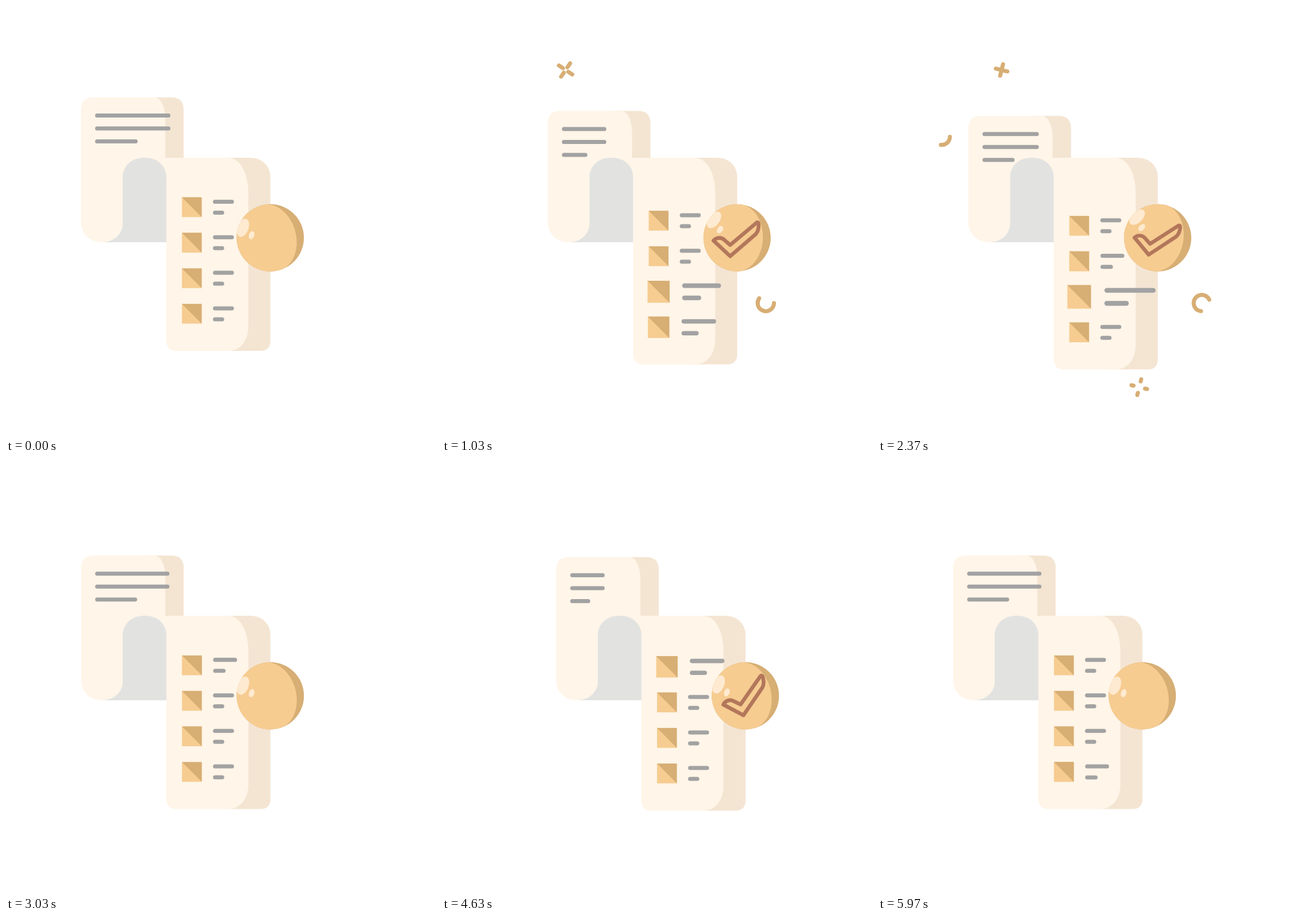
An HTML page with a canvas that plays this animation: 748x748 px, repeating every 6 s.

```html
<!DOCTYPE html>
<html lang="en">
<head>
<meta charset="utf-8">
<title>Checklist</title>
<style>
html, body { margin: 0; height: 100%; overflow: hidden; background: #fff; }
canvas { display: block; }
</style>
</head>
<body>
<canvas id="stage" width="748" height="748"></canvas>
<script>
const c = document.getElementById('stage').getContext('2d');
const LIGHT = '#fff5e8', SHADE = '#f4e5d3', GREY = '#e2e3e1', INK = '#a2a2a2';
const GOLD = '#f6cc91', DARK = '#d7ae74', SHINE = '#feead1', TICK = '#b3775b';
const RAD = Math.PI / 180, FRAME = 100 / 3;

const clamp = v => Math.min(1, Math.max(0, v));
const smooth = v => (v = clamp(v)) * v * (3 - 2 * v);
// Rises from 0 to 1 until the peak, then falls back to 0 at the end.
const tent = (t, peak, end) => clamp(t < peak ? t / peak : (end - t) / (end - peak));

function fill(d, color) {
  c.fillStyle = color;
  c.fill(new Path2D(d));
}

function at(x, y, turn, scale, draw) {
  c.save();
  c.translate(x, y);
  c.rotate(turn * RAD);
  c.scale(scale, scale);
  draw();
  c.restore();
}

function stroke(d, color, width) {
  c.strokeStyle = color;
  c.lineWidth = width;
  c.stroke(new Path2D(d));
}

// A round-capped bar whose outer width is w
const bar = (x, y, w) => stroke(`M${x + 3.5},${y}h${w - 7}`, INK, 7);

function ellipse(x, y, rx, ry, turn, color) {
  c.fillStyle = color;
  c.beginPath();
  c.ellipse(x, y, rx, ry, turn * RAD, 0, 7);
  c.fill();
}

function paper(dy, shrink) {
  const top = 159 + dy, end = 600 + dy;
  fill(`M240,${top}H288Q309,${top} 309,${top + 22}V280H240Z`, SHADE);
  fill(`M130.5,${top + 22}Q130.5,${top} 152,${top}H258C269,${top} 277,${top + 16} 277,${top + 36}
    V300H203V378C203,397 187,411 167,411S130.5,397 130.5,376Z`, LIGHT);
  fill(`M370,264H425C445,264 460,278 460,298V${end - 18}Q460,${end} 442,${end}H370Z`, SHADE);
  fill(`M241,264H386C407,264 421.5,290 421.5,325V${end - 43}
    C421.5,${end - 17} 407,${end} 386,${end}H297Q279,${end} 279,${end - 18}V300H241Z`, LIGHT);
  fill(`M167,411C187,411 203,397 203,378V298C203,278 219,264 239,264H243
    C263,264 279,278 279,298V411Z`, GREY);
  bar(155, top + 31.5, 131 - 78 * shrink);
  bar(155, top + 54, 131 - 78 * shrink);
  bar(155, top + 76.5, 74 - 43 * shrink);
}

function item(i, t, dy) {
  const grow = tent(t - 300 * i, 300, 600);
  at(323.2, 350 + 61.8 * i + dy, 0, 1 + 0.2 * smooth(grow), () => {
    fill('M-17.2,-17.2h34.4v34.4h-34.4Z', GOLD);
    fill('M-17.2,-17.2h34.4v34.4Z', DARK);
    bar(36.8, -9.5, 36.5 + 43 * grow);
    bar(36.8, 9.5, 19.5 + 18 * grow);
  });
}

function badge(turn, tick) {
  at(459.7, 403.2, turn, 1, () => {
    c.save();
    c.beginPath();
    c.arc(0, 0, 58.5, 0, 7);
    c.clip();
    c.fillStyle = DARK;
    c.fillRect(-60, -60, 120, 120);
    c.save();
    c.rotate(-15 * RAD);
    fill('M0,-59A45,59 0 0 1 0,59H-60V-59Z', GOLD);
    c.restore();
    ellipse(-47.5, -17.5, 9.6, 16.5, 20, SHINE);
    ellipse(-32.5, -4.5, 4.7, 7.2, 18, SHINE);
    c.restore();
    if (tick > 0.005) at(0, 0, -17.5, tick, () => stroke(`M-41,5C-36,-1 -28,-1 -23,3L-12,12.5
      L33,-25.5C37,-29 38,-25 37.5,-20C37,-12 35,-9 32,-6L-12,32Z`, TICK, 6.6));
  });
}

// Drawn part of a path that grows from its start and is then eaten up from its start
function trim(t, start) {
  return [clamp((t - start - 333.3) / 500), clamp((t - start) / 500)];
}

function spark(x, y, t, start) {
  const [a, b] = trim(t, start);
  if (b - a < 0.001) return;
  for (let k = 0; k < 4; k++) {
    at(x, y, 0.12 * t + 90 * k, 1, () => stroke(`M${14 * a},0H${14 * b}`, DARK, 7));
  }
}

function ring(x, y, t, start) {
  const [a, b] = trim(t, start);
  if (b - a < 0.001) return;
  c.strokeStyle = DARK;
  c.lineWidth = 7;
  c.beginPath();
  c.arc(x, y, 14.2, -a * 2 * Math.PI, -b * 2 * Math.PI, true);
  c.stroke();
}

function draw(now) {
  const long = Math.floor((now % 6000 + 4) / FRAME) * FRAME % 3000;
  const t = long % 1500;
  const sway = tent(long, 1500, 3000);
  const dy = 34.6 * smooth(tent(t, 750, 1500));
  const tick = smooth(Math.min(long / 767, (3000 - long) / 700));

  c.clearRect(0, 0, 748, 748);
  c.lineCap = c.lineJoin = 'round';
  at(69.6 * smooth(sway), 0, 0, 1, () => {
    paper(dy, sway);
    for (let i = 0; i < 4; i++) item(i, t, dy);
    badge(28.1 * smooth(tent(t, 700, 1500)), tick);
  });
  spark(215, 111.3, t, 500);
  spark(454.5, 663, t, 166.7);
  ring(110.8, 227.4, t, 166.7);
  ring(563.3, 516.7, t, 500);
}

let begin;
function loop(now) {
  begin ??= now;
  draw(now - begin);
  requestAnimationFrame(loop);
}
draw(0);
requestAnimationFrame(loop);
</script>
</body>
</html>
```
